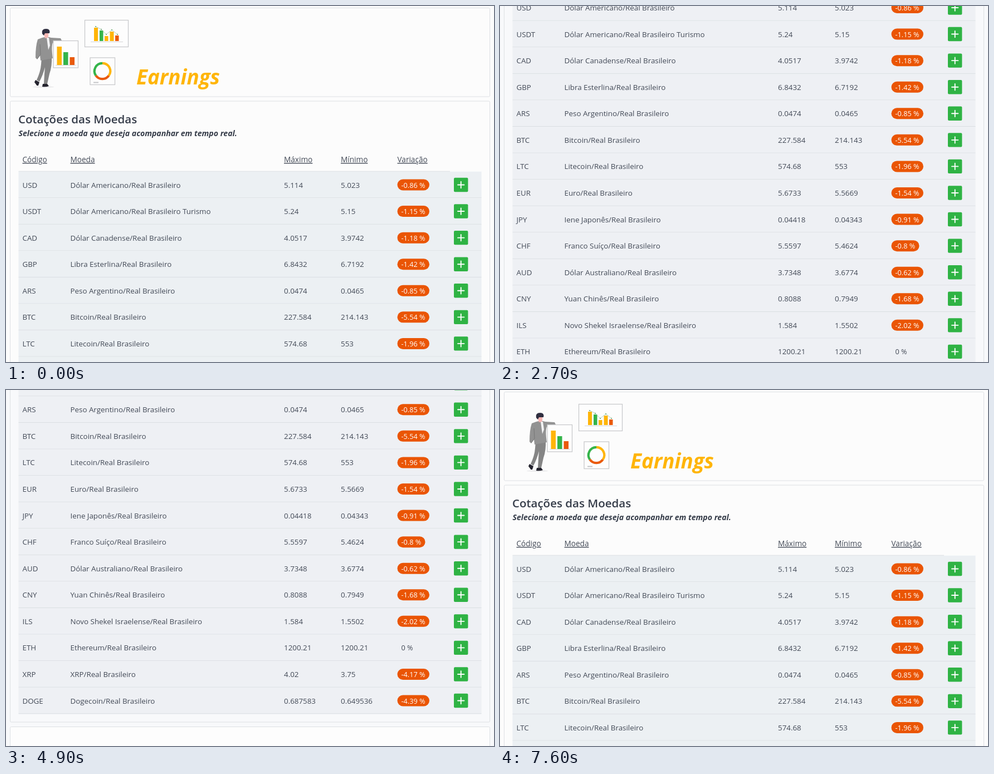
Recreate the animation shown at these times as an HTML page. Size 876x640 px, loop 8000 ms.

```html
<!DOCTYPE html>
<html lang="pt-BR">
<head>
<meta charset="utf-8">
<title>Cotações das Moedas</title>
<style>
  html, body { margin: 0; width: 100%; height: 100%; overflow: hidden; }
  svg { display: block; width: 876px; height: 640px; background: var(--page); }
  text { font: 13.35px "Open Sans", "Noto Sans", sans-serif; fill: #434a57; }
  .brand { font-size: 36.8px; font-weight: 700; font-style: italic; fill: #ffb508; }
  .title { font-size: 20.5px; font-weight: 600; fill: #363d4a; }
  .subtitle { font-size: 14.1px; font-weight: 700; font-style: italic; fill: #343b48; }
  .head { font-size: 13.6px; text-decoration: underline; text-underline-offset: 2px; }
  .change { font-size: 12.7px; }
  .loss { fill: #fff; }
  .card { fill: var(--page); stroke: #dde0e4; }
  .row { fill: var(--row); }
  .line { stroke: #dadee2; }
  .panel { fill: #fdfdfd; stroke: #c9cacc; stroke-width: 1.3; }
  .plus { stroke: #fff; stroke-width: 1.9; stroke-linecap: round; }
</style>
</head>
<body>
<svg id="stage" viewBox="0 0 876 640">
  <g id="content">
    <rect class="card" x="7.5" y="3.5" width="861" height="159.5" rx="2"/>
    <g id="person">
      <ellipse cx="67" cy="145.5" rx="19" ry="1" fill="#e4e4e6"/>
      <path d="M64 92 82 91Q83 108 78 122L74 140H68L69 122 70 110Q66 125 60 136L55 133Q62 118 63 105Z" fill="#858585"/>
      <path d="M53 133l7 4-2 6q-3 1-4-2l-3-4zM66 140h8l3 4q-5 2-12 1z" fill="#25242f"/>
      <path d="M65 57Q74 54 81 57L98 58 100 62 84 66Q81 73 84 94L62 98 61 89 56 96 53 93Q53 72 57 60Z" fill="#929292"/>
      <path d="M73 57h4l2 14-3 8z" fill="#f3f3f4"/>
      <path d="M61 69l1 18-6 8" fill="none" stroke="#777"/>
      <path d="M67 48h9q1 5-1 9l-5 1z" fill="#f6b6b3"/>
      <path d="M65 50q-2-9 7-9 8 0 6 8l-8 0-2 4z" fill="#302f40"/>
    </g>
    <rect class="panel" x="85" y="62.5" width="44.5" height="48.5"/>
    <rect class="panel" x="141.5" y="25.5" width="78" height="48"/>
    <rect class="panel" x="151" y="93" width="44.5" height="48.5"/>
    <g id="bars"></g>
    <path d="M89 106.5H126M152 64.5H210" stroke="#d5d6d8"/>
    <path d="M161 37 171 42 180 51 190 43 200 51" fill="none" stroke="#a6c9ad" stroke-width=".8"/>
    <g id="dots" fill="#62a570"></g>
    <g fill="none" stroke-width="4.2">
      <path d="M161.3 125A14.2 14.2 0 0 1 173 102.8" stroke="#34b44a"/>
      <path d="M173 102.8A14.2 14.2 0 0 1 184.5 125.3" stroke="#ffb508"/>
      <path d="M184.5 125.3A14.2 14.2 0 0 1 161.3 125" stroke="#ea5a0c"/>
    </g>
    <path d="M157 137.5h9" stroke="#c4c5c8" stroke-width="2"/>
    <text class="brand" x="234" y="141">Earnings</text>

    <rect class="card" x="7.5" y="171" width="861" height="902.5" rx="2"/>
    <text class="title" x="22" y="210.5">Cotações das Moedas</text>
    <text class="subtitle" x="22.5" y="234">Selecione a moeda que deseja acompanhar em tempo real.</text>
    <g id="table"></g>
    <rect class="card" x="7.5" y="1082" width="861" height="200" rx="2" style="fill:#fdfdfd"/>
  </g>
</svg>
<script>
const $ = id => document.getElementById(id);
const columns = [29.5, 115.5, 499, 601, 702.5];
const rowHeight = 47.57, tableTop = 297.7;

const quotes = `USD|Dólar Americano|5.114|5.023|-0.86
USDT|Dólar Americano|5.24|5.15|-1.15
CAD|Dólar Canadense|4.0517|3.9742|-1.18
GBP|Libra Esterlina|6.8432|6.7192|-1.42
ARS|Peso Argentino|0.0474|0.0465|-0.85
BTC|Bitcoin|227.584|214.143|-5.54
LTC|Litecoin|574.68|553|-1.96
EUR|Euro|5.6733|5.5669|-1.54
JPY|Iene Japonês|0.04418|0.04343|-0.91
CHF|Franco Suíço|5.5597|5.4624|-0.8
AUD|Dólar Australiano|3.7348|3.6774|-0.62
CNY|Yuan Chinês|0.8088|0.7949|-1.68
ILS|Novo Shekel Israelense|1.584|1.5502|-2.02
ETH|Ethereum|1200.21|1200.21|0
XRP|XRP|4.02|3.75|-4.17
DOGE|Dogecoin|0.687583|0.649536|-4.39`.split('\n').map(line => line.split('|'));

const text = (x, y, value, cls = '') => `<text class="${cls}" x="${x}" y="${y}">${value}</text>`;

function badge(change, y) {
  const loss = change.startsWith('-');
  const width = change.length < 5 ? 50 : 57.5;
  const pill = loss ? `<rect x="702.5" y="${y - 10}" width="${width}" height="20" rx="10" fill="#ea5504"/>` : '';
  return pill + text(709.5, y + 5, change + ' %', 'change' + (loss ? ' loss' : ''));
}

function row([code, name, high, low, change], i) {
  const top = tableTop + i * rowHeight, y = top + 23.8;
  const pair = name + '/Real Brasileiro' + (code === 'USDT' ? ' Turismo' : '');
  const cells = [code, pair, high, low].map((value, c) => text(columns[c], y + 5, value)).join('');
  return `<rect class="row" x="22.5" y="${top}" width="831" height="${rowHeight}"/>
    <path class="line" d="M22.5 ${top + rowHeight - .5}H853.5"/>${cells}${badge(change, y)}
    <rect x="804" y="${y - 12.7}" width="25.4" height="25.4" rx="2" fill="#2fb344"/>
    <path class="plus" d="M811 ${y}h11.4M816.7 ${y - 5.7}v11.4"/>`;
}

$('table').innerHTML =
  ['Código', 'Moeda', 'Máximo', 'Mínimo', 'Variação'].map((label, c) => text(columns[c], 281, label, 'head')).join('') +
  quotes.map(row).join('') + `<path class="line" d="M22.5 297.2H797"/>`;

// x, top, width, baseline, colour
const yellow = '#ffb508', green = '#34b44a', orange = '#ea5a0c';
$('bars').innerHTML = [
  [91.5, 73, 8.5, 106, yellow], [103, 83, 8.5, 106, green], [114.5, 92, 8.5, 106, orange],
  [158, 39, 7, 63, yellow], [168, 44, 6.5, 63, green], [177, 54, 6.5, 63, yellow],
  [186.5, 46, 7, 63, yellow], [196, 53, 6.5, 63, orange]
].map(([x, y, w, base, fill]) => `<rect x="${x}" y="${y}" width="${w}" height="${base - y}" fill="${fill}"/>`).join('');
$('dots').innerHTML = [[161, 37], [171, 42], [180, 51], [190, 43], [200, 51]]
  .map(([x, y]) => `<circle cx="${x}" cy="${y}" r="1.1"/>`).join('');

// time in ms, scroll offset in px
const scrollKeys = [
  [0, 0], [400, 0], [600, 14], [1300, 147], [1500, 161], [1600, 161], [1800, 175], [2500, 304],
  [2700, 318.5], [2800, 322], [2900, 322], [3100, 334], [3800, 454], [4200, 483], [4800, 483],
  [5000, 470], [5700, 353], [6100, 275], [6200, 275], [6500, 178.5], [7300, 20], [7400, 20], [7600, 0], [8000, 0]
];

function scrollAt(time) {
  const i = scrollKeys.findIndex(([end]) => time < end);
  const [t0, s0] = scrollKeys[i - 1], [t1, s1] = scrollKeys[i];
  return s0 + (s1 - s0) * (time - t0) / (t1 - t0);
}

function draw(now) {
  const time = Math.floor(now % 8000 / 100) * 100;
  const scroll = scrollAt(time);
  $('content').setAttribute('transform', `translate(0 ${-scroll})`);
  $('stage').style.setProperty('--page', scroll < 150 ? '#fcfcfc' : '#f8f9fb');
  $('stage').style.setProperty('--row', scroll < 250 ? '#ecf0f3' : '#eef0f4');
  requestAnimationFrame(draw);
}
draw(performance.now());
</script>
</body>
</html>
```
